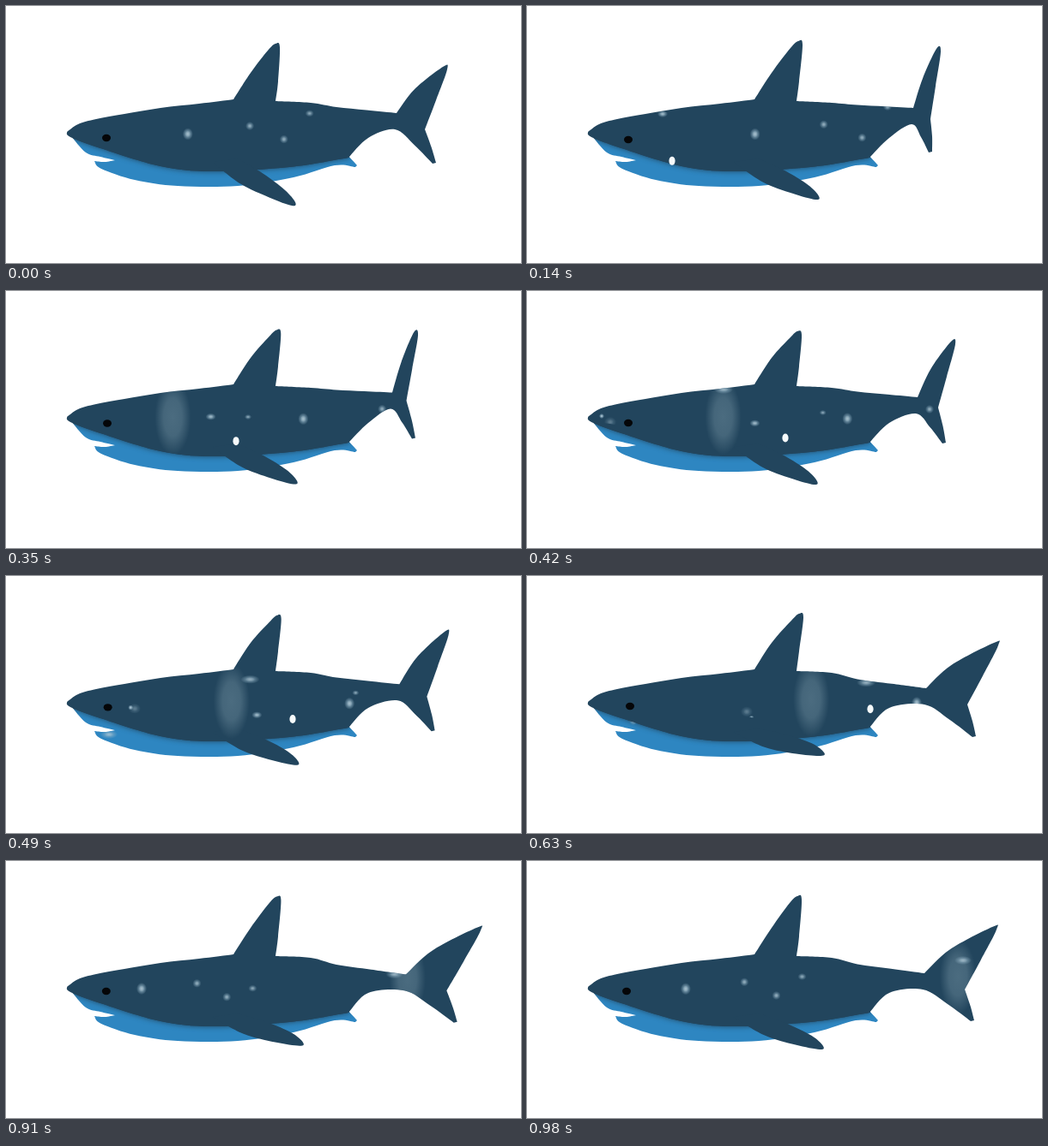
An HTML page with a canvas that plays this animation: 600x300 px, repeating every 1.05 s.

```html
<!DOCTYPE html>
<html lang="en">
<head>
<meta charset="utf-8">
<title>Swimming shark</title>
<style>
html, body { margin: 0; width: 100%; height: 100%; overflow: hidden; background: #fff; }
canvas { display: block; }
</style>
</head>
<body>
<canvas id="stage" width="600" height="300"></canvas>
<script>
const ctx = document.getElementById('stage').getContext('2d');
const STEP = 70, COUNT = 15;
const DARK = '#22455d', BLUE = '#2e86c1';

// Key poses start with their step, then x, y pairs.
// eye, dorsal tip
const headKeys = [
  [0, 117, 154, 316, 44],
  [2, 118, 156, 318, 41],
  [6, 118, 154, 317, 47],
  [9, 120, 152, 319, 44],
  [14, 116, 152, 317, 41]
];
// joint, upper tip, notch, lower tip, side fin tip
const tailKeys = [
  [0, 455, 125, 514, 72, 488, 144, 501, 183, 336, 233],
  [2, 450, 119, 482, 51, 470, 132, 472, 170, 339, 226],
  [4, 445, 113, 461, 39, 454, 120, 466, 166, 339, 225],
  [6, 455, 124, 499, 60, 479, 136, 488, 177, 337, 226],
  [9, 465, 131, 549, 79, 513, 150, 523, 187, 345, 210],
  [11, 472, 135, 565, 81, 520, 154, 535, 191, 347, 207],
  [14, 463, 131, 547, 78, 510, 150, 521, 186, 344, 220]
];

// Drifting lights: first step, x, y, last step, x, y, bend
const pearl = [1, 136, 181, 11, 466, 140, 11];
const band = [3, 126, 148, 14, 502, 135, 3];
// the same, then radii and strength
const spots = [
  [13, 158, 149, 24, 454, 148, 1, 6, 7, .8],
  [10, 130, 149, 21, 469, 138, -4, 5, 5, .65],
  [9, 124, 169, 19, 457, 153, -4, 5, 5, .65],
  [11, 221, 188, 17, 420, 118, -18, 5, 4, .6],
  [2, 158, 126, 9, 346, 179, -2, 6, 4, .75],
  [2, 94, 158, 8, 470, 130, 3, 4, 3, .6],
  [6, 87, 146, 11, 378, 174, 3, 3, 3, .9],
  [6, 97, 153, 11, 362, 162, 0, 7, 6, .3],
  [7, 120, 185, 14, 508, 116, 13, 10, 5, .65],
  [6, 229, 115, 11, 506, 118, 8, 11, 5, .65]
];

const mix = (a, b, u) => a.map((v, i) => v + (b[i] - v) * u);
const shift = (p, dx, dy) => [p[0] + dx, p[1] + dy];
const between = (a, b, u, dx, dy) => shift(mix(a, b, u), dx, dy);

function pose(keys, k) {
  const all = [...keys, [COUNT, ...keys[0].slice(1)]];
  const i = Math.max(1, all.findIndex(key => key[0] >= k));
  const a = all[i - 1], b = all[i];
  const row = mix(a, b, (k - a[0]) / (b[0] - a[0]));
  const pts = [];
  for (let j = 1; j < row.length; j += 2) pts.push([row[j], row[j + 1]]);
  return pts;
}

function drift([k0, x0, y0, k1, x1, y1, bend], k) {
  if (k < k0) k += COUNT;
  if (k > k1) return null;
  const u = (k - k0) / (k1 - k0);
  return between([x0, y0], [x1, y1], u, 0, 4 * bend * u * (1 - u));
}

// Each run is a smooth curve; runs meet in corners.
function outline(...runs) {
  const path = new Path2D();
  path.moveTo(...runs[0][0]);
  for (const run of runs) {
    path.lineTo(...run[0]);
    for (let i = 0; i < run.length - 1; i++) {
      const p = run[i], q = run[i + 1];
      const a = run[i - 1] || p, b = run[i + 2] || q;
      path.bezierCurveTo(p[0] + (q[0] - a[0]) / 6, p[1] + (q[1] - a[1]) / 6,
        q[0] - (b[0] - p[0]) / 6, q[1] - (b[1] - p[1]) / 6, ...q);
    }
  }
  path.closePath();
  return path;
}

function glow([x, y], rx, ry, rgb, strength, core) {
  ctx.save();
  ctx.translate(x, y);
  ctx.scale(rx, ry);
  const g = ctx.createRadialGradient(0, 0, 0, 0, 0, 1);
  g.addColorStop(0, `rgba(${rgb},${strength})`);
  g.addColorStop(core, `rgba(${rgb},${strength * .85})`);
  g.addColorStop(1, `rgba(${rgb},0)`);
  ctx.fillStyle = g;
  ctx.fillRect(-1, -1, 2, 2);
  ctx.restore();
}

function oval([x, y], rx, ry, color) {
  ctx.fillStyle = color;
  ctx.beginPath();
  ctx.ellipse(x, y, rx, ry, 0, 0, 7);
  ctx.fill();
}

const nose = [71, 147], hip = [399, 177], dorsalFront = [265, 109], dorsalBack = [314, 111];
const belly = outline(
  [[76, 152], [93, 171], [110, 176], [127, 180]],
  [[127, 180], [115, 182], [103, 181]],
  [[103, 181], [111, 190], [150, 203], [200, 210], [270, 210], [335, 200], [383, 186], [407, 188]],
  [[409, 186], [398, 174]],
  [[398, 174], [260, 165], [140, 160], [76, 152]]
);

function bodyPath(top, joint, tip, notch, lowTip) {
  const back = [385, 118 + (joint[1] - 125) * .4];
  const lowJoint = shift(joint, -2, 19);
  return outline(
    [nose, [84, 138], [105, 132], [138, 126], [180, 119], [225, 114], dorsalFront],
    [dorsalFront, [285, 78], shift(top, -11, 8), shift(top, -2, 0), shift(top, 3, 4), [317, 88], dorsalBack],
    [dorsalBack, [355, 113], back, mix(back, joint, .5), joint],
    [joint, between(joint, tip, .5, (joint[0] - tip[0]) * .15, -1), shift(tip, -5, -1),
      shift(tip, 0, 2), between(tip, notch, .5, 0, 2), notch],
    [notch, between(notch, lowTip, .5, 1, 1), lowTip],
    [shift(lowTip, -4, 1), between(lowTip, lowJoint, .5, -1, -1), lowJoint, [422, 154], hip],
    [hip, [330, 188], [240, 193], [180, 187], [110, 166], [75, 153], nose]
  );
}

function finPath(tip) {
  const low = [240, 182], high = [270, 178];
  return outline([low, between(low, tip, .35, 0, 8), between(low, tip, .7, 0, 6), shift(tip, -3, 0),
    shift(tip, 1, -4), between(high, tip, .83, 0, -9), between(high, tip, .45, 0, -7), high]);
}

function draw(k) {
  const [eye, top] = pose(headKeys, k);
  const [joint, tip, notch, lowTip, finTip] = pose(tailKeys, k);
  const body = bodyPath(top, joint, tip, notch, lowTip);

  ctx.fillStyle = '#fff';
  ctx.fillRect(0, 0, 600, 300);
  ctx.fillStyle = BLUE;
  ctx.fill(belly);

  // soft line where the back meets the belly
  ctx.save();
  ctx.clip(belly);
  ctx.shadowColor = DARK;
  ctx.shadowBlur = 6;
  ctx.fillStyle = DARK;
  ctx.fill(body);
  ctx.restore();

  ctx.fillStyle = DARK;
  ctx.fill(body);
  ctx.fill(finPath(finTip));

  ctx.save();
  ctx.clip(body);
  const stripe = drift(band, k);
  if (stripe) glow(stripe, 21, 44, '125,155,170', .45, .5);
  ctx.restore();

  ctx.save();
  const skin = new Path2D(body);
  skin.addPath(belly);
  ctx.clip(skin);
  for (const spot of spots) {
    const p = drift(spot, k);
    if (!p) continue;
    const [rx, ry, strength] = spot.slice(7);
    glow(p, rx, ry, '150,182,200', strength, .4);
    glow(p, rx / 2, ry / 2, '205,222,230', strength * .6, .3);
  }
  ctx.restore();

  const p = drift(pearl, k);
  if (p) oval(p, 3.6, 5, k > 9 ? '#cbd8de' : '#f6fafb');
  oval(eye, 5, 4.2, '#050608');
}

function frame() {
  draw(Math.floor(performance.now() / STEP) % COUNT);
  requestAnimationFrame(frame);
}
frame();
</script>
</body>
</html>
```
